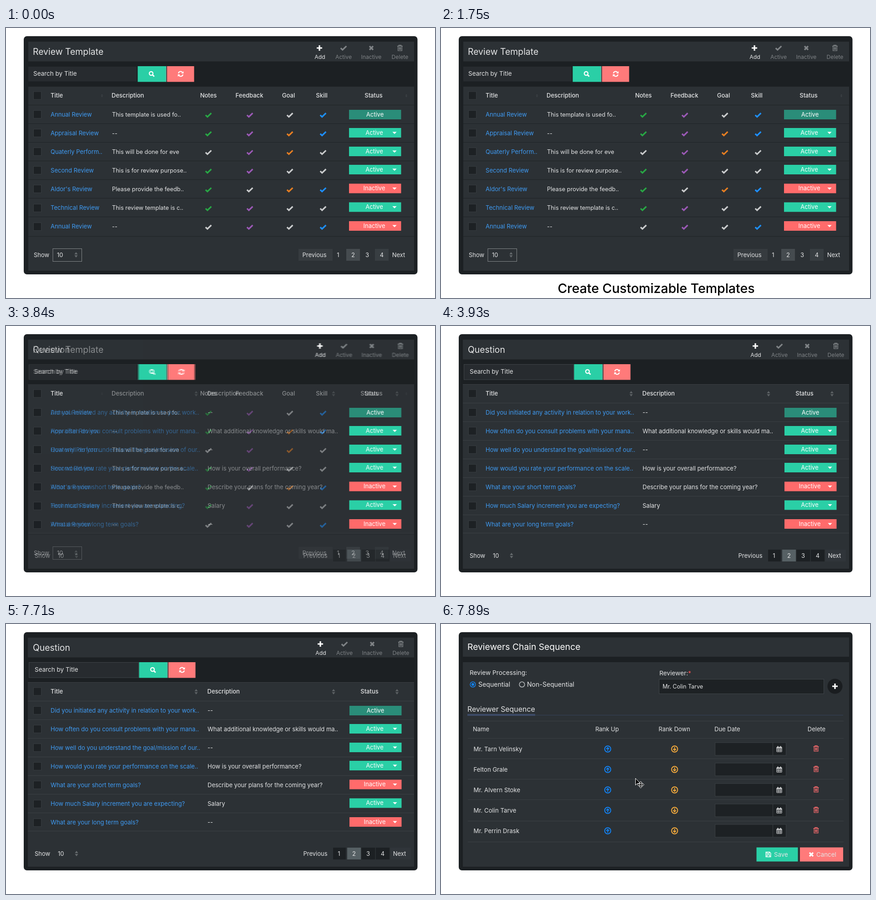
Animation of 943x594 px, one loop 8 s. Source, as an HTML page:

```html
<!DOCTYPE html>
<html lang="en">
<head>
<meta charset="utf-8">
<title>Review screens</title>
<style>
  html, body { margin: 0; width: 100%; height: 100%; overflow: hidden; background: #fff; }
  svg { display: block; }
  text { font: 13px Inter, "Open Sans", sans-serif; fill: #e4e5e6; white-space: pre; }
  .head { font-weight: 500; }
  .link { fill: #3f9bf3; }
  .dim { fill: #7f8386; }
  .caption { font-size: 28.5px; font-weight: 500; fill: #000; text-anchor: middle;
    animation: drop 8s infinite backwards; }
  .late { animation-delay: 3960ms; }
  #second { animation: second 8s infinite; }
  #third { animation: third 8s infinite; }

  /* captions slide out from under the panel, then vanish at once */
  @keyframes drop {
    0% { transform: translateY(-48px); }
    13.125% { transform: translateY(-48px); animation-timing-function: steps(7, jump-both); }
    21.875% { transform: translateY(0); animation-timing-function: step-end; }
    46.875%, 100% { transform: translateY(-48px); }
  }
  @keyframes second {
    0% { opacity: 0; }
    46.875% { opacity: 0; animation-timing-function: steps(6, end); }
    49.125%, 100% { opacity: 1; }
  }
  @keyframes third {
    0% { opacity: 0; }
    96.375% { opacity: 0; animation-timing-function: steps(6, end); }
    98.625%, 100% { opacity: 1; }
  }
</style>
</head>
<body>
<svg id="stage" width="943" height="594" viewBox="0 0 943 594"></svg>
<script>
const DARK = '#1c2023', BODY = '#2c3135', LINE = '#3b4044';
const GREEN = '#2acfa6', RED = '#ff6b6b', PINK = '#ff7a7a', GREY = '#7f8386', WHITE = '#fff';
const TICKS = { g: '#28a745', p: '#9b59b6', w: '#cacccd', o: '#e67e22', b: '#1e90ff' };

const rect = (x, y, w, h, fill, more = '') =>
  `<rect x="${x}" y="${y}" width="${w}" height="${h}" fill="${fill}" ${more}/>`;
const box = (x, y, w, h, fill, edge) =>
  rect(x + .5, y + .5, w - 1, h - 1, fill, `stroke="${edge}"`);
const path = (d, fill, more = '') => `<path d="${d}" fill="${fill}" ${more}/>`;
const stroke = (d, color, width) => path(d, 'none', `stroke="${color}" stroke-width="${width}"`);
const rule = (x1, x2, y, color = LINE) => rect(x1, y, x2 - x1, 1, color);
const at = (x, y, shape) => `<g transform="translate(${x} ${y})">${shape}</g>`;

// y is the middle of the capitals
function label(s, x, y, { size = 13, mid = false, cls = '', style = '' } = {}) {
  return `<text x="${x}" y="${y + size * .36}" class="${cls}" ` +
    `style="font-size:${size}px;${style}"${mid ? ' text-anchor="middle"' : ''}>${s}</text>`;
}

const icon = {
  tick: c => stroke('M-6.3 .3L-2.2 4.1L6.3 -4.1', c, 3.3),
  plus: c => stroke('M-6 0H6M0 -6V6', c, 3.2),
  cross: c => stroke('M-4 -4L4 4M4 -4L-4 4', c, 3.4),
  trash: c => stroke('M-6 -4.3H6M-2.5 -4.5V-6.3H2.5V-4.5', c, 1.4) +
    stroke('M-4.4 -4V5.8H4.4V-4M-1.9 -2V4M0 -2V4M1.9 -2V4', c, 1.3),
  search: c => `<circle cx="-1" cy="-1" r="4" fill="none" stroke="${c}" stroke-width="2.3"/>` +
    stroke('M2 2L5.8 5.8', c, 2.7),
  refresh: c => stroke('M-5 -1.3A5 5 0 0 1 4 -3.2M5 1.3A5 5 0 0 1 -4 3.2', c, 2.1) +
    path('M6.3 -6V-1H1.3ZM-6.3 6V1H-1.3Z', c),
  sort: c => path('M-3.6 -1L0 -6L3.6 -1ZM-3.6 1L0 6L3.6 1Z', c),
  caret: c => path('M-4.7 -2.2H4.7L0 2.5Z', c),
  up: c => `<circle r="6.7" fill="none" stroke="${c}" stroke-width="1.9"/>` +
    stroke('M0 4.2V-2.6M-3.3 .2L0 -3.1L3.3 .2', c, 1.9),
  down: c => `<g transform="scale(1 -1)">${icon.up(c)}</g>`,
  calendar: c => stroke('M-5.5 -4H5.5V6H-5.5ZM-5.5 -.8H5.5M-5.5 2.6H5.5M-1.9 -1V6M1.9 -1V6', c, 1) +
    stroke('M-5.5 -3.2H5.5M-3 -6.5V-3M3 -6.5V-3', c, 1.7),
  floppy: c => stroke('M-5.3 -5.3H2.8L5.3 -2.8V5.3H-5.3ZM-3 5V1H3V5M-3 -5V-2H2V-5', c, 1.4)
};

const checkbox = y => box(60, y - 9, 18, 18, '#1d2124', '#363b3f');

function toolbar(dx) {
  const items = [['Add', 690, 'plus', WHITE], ['Active', 742, 'tick', GREY],
    ['Inactive', 803, 'cross', GREY], ['Delete', 866, 'trash', GREY]];
  return items.map(([name, x, kind, color]) =>
    at(x + dx - (kind === 'plus' ? 1 : 0), 44, icon[kind](color)) +
    label(name, x + dx, 64, { size: 12.2, mid: true, cls: color === GREY ? 'dim' : '' })).join('');
}

function searchBar(dx) {
  return label('Search by Title', 60 + dx, 100.5, { size: 13.5 }) +
    rect(289.5 + dx, 84, 62, 34.5, GREEN) + rect(351.5 + dx, 84, 1, 34.5, '#a9d9cc') +
    at(320 + dx, 101, icon.search(WHITE)) +
    rect(354 + dx, 84, 59.5, 34.5, PINK) + at(384 + dx, 101, icon.refresh(WHITE));
}

const STATUS_Y = [180, 220, 261, 301, 342.5, 383.5, 425];
function status(i, dx) {
  const y = STATUS_Y[i], off = i === 4 || i === 6;
  const fill = i === 0 ? '#2a8d79' : off ? RED : GREEN;
  return rect(754 + dx, y, 114.5, 21, fill) +
    label(off ? 'Inactive' : 'Active', (i ? 809.5 : 811) + dx, y + 10.3, { mid: true, style: 'fill:#fff' }) +
    (i ? at(854 + dx, y + 10.7, icon.caret(WHITE)) : '');
}

const rowY = i => 190 + 41.1 * i;

function listScreen({ title, dx, rows, bottom, line, cells }) {
  const left = dx ? 48 : 49;
  let out = rect(46, 26, 853, 510, DARK) +
    rect(left, 30, 897 - left, 43.5, BODY) + rect(left, 129, 897 - left, 405, BODY) +
    label(title, 59, 52, { size: 19.4 }) + toolbar(dx) + checkbox(148.5) +
    label('Title', 98, 148.5, { cls: 'head' });
  rows.forEach((row, i) => {
    const y = rowY(i);
    out += rule(left, 897, Math.round(168.6 + 41.1 * i), line) + checkbox(Math.round(y)) +
      label(row[0], 98, y, { cls: 'link', size: 13.1 }) + cells(row, y) + status(i, dx / 2);
  });
  return out + rule(left, 897, bottom, line);
}

function pager(y, dx, fills) {
  const cells = [['Previous', 678, 643, 75], ['1', 730, 717, 28], ['2', 763, 748, 30],
    ['3', 794, 779.5, 30], ['4', 826, 811, 30], ['Next', 863, 843, 45]];
  return cells.map(([s, x, left, w], i) =>
    (fills[i] ? rect(left + dx, y - 13, w, 26, fills[i]) : '') +
    label(s, x + dx, y, { mid: true })).join('');
}

function templates() {
  const rows = [
    ['Annual Review', 'This template is used fo..', 'gpwb'],
    ['Appraisal Review', '--', 'gpob'],
    ['Quaterly Perform..', 'This will be done for eve', 'wpow'],
    ['Second Review', 'This is for review purpose..', 'gpww'],
    ['Aldor\'s Review', 'Please provide the feedb..', 'gwob'],
    ['Technical Review', 'This review template is c..', 'gpww'],
    ['Annual Review', '--', 'wpwb']
  ];
  const columns = [445, 536, 624, 697];
  const heads = [['Notes', 445], ['Feedback', 535], ['Goal', 621], ['Skill', 694], ['Status', 808]];
  const cells = (row, y) => label(row[1], 233, y, { size: 12.8 }) +
    columns.map((x, k) => at(x, y + 1.3, icon.tick(TICKS[row[2][k]]))).join('');
  return listScreen({ title: 'Review Template', dx: 0, rows, bottom: 458, line: '#1f2326', cells }) +
    label('Description', 232, 148, { cls: 'head' }) +
    heads.map(([s, x]) => label(s, x, 148, { mid: true, cls: 'head' })).join('') +
    [211, 880].map(x => at(x, 149, `<g transform="scale(.6)">${icon.sort('#3d4246')}</g>`)).join('') +
    rect(49, 85, 238, 32.5, '#272b2f') + searchBar(0) +
    label('Show', 61, 499) + box(102.5, 485, 64.5, 29, 'none', '#85898b') +
    label('10', 112, 499) + at(154, 499, icon.sort('#656a6d')) +
    pager(499, 0, ['#363b3f', '', '#454b4f', '', '#383e42', '']);
}

function questions() {
  const rows = [
    ['Did you initiated any activity in relation to your work..', '--'],
    ['How often do you consult problems with your mana..', 'What additional knowledge or skills would ma..'],
    ['How well do you understand the goal/mission of our..', '--'],
    ['How would you rate your performance on the scale..', 'How is your overall performance?'],
    ['What are your short term goals?', 'Describe your plans for the coming year?'],
    ['How much Salary increment you are expecting?', 'Salary'],
    ['What are your long term goals?', '--']
  ];
  const cells = (row, y) => label(row[1], 443, y);
  return listScreen({ title: 'Question', dx: 2, rows, bottom: 455, line: LINE, cells }) +
    rule(48, 897, 128) +
    label('Description', 442.5, 148, { cls: 'head' }) +
    label('Status', 799, 148, { mid: true, cls: 'head' }) +
    [418, 720, 859.5].map(x => at(x, 149, icon.sort('#5d6265'))).join('') +
    box(50, 84, 242, 34.5, '#272b2f', '#3f4448') + searchBar(3) +
    label('Show', 63, 505) + label('10', 114, 505) + at(155, 505, icon.sort('#656a6d')) +
    pager(505, 2, ['', DARK, '#566064', DARK, DARK, '#30353a']);
}

function radio(x, on) {
  return `<circle cx="${x}" cy="133" r="5.8" fill="none" stroke="${on ? '#1283f5' : '#b9bcbe'}" stroke-width="1.5"/>` +
    (on ? `<circle cx="${x}" cy="133" r="3" fill="#1283f5"/>` : '');
}

function chain() {
  const people = ['Mr. Tarn Velinsky', 'Felton Grale', 'Mr. Alvern Stoke', 'Mr. Colin Tarve', 'Mr. Perrin Drask'];
  const button = { size: 13.3, style: 'font-family:"Liberation Sans",sans-serif;fill:#fff' };
  let out = rect(46, 26, 853, 510, DARK) +
    rect(48, 29.5, 849, 42.5, BODY) + rect(48, 84, 849, 450, BODY) +
    label('Reviewers Chain Sequence', 58, 50, { size: 19.3, style: 'fill:#fff' }) +
    label('Review Processing:', 63, 107, { size: 13.7 }) +
    radio(70, true) + label('Sequential', 82, 133, { size: 14.1 }) +
    radio(178, false) + label('Non-Sequential', 189, 133, { size: 14.1 }) +
    label('Reviewer:<tspan fill="#ff5252">*</tspan>', 480, 108, { size: 13.7 }) +
    box(479, 121, 363, 33, '#1d2124', '#3f4448') +
    label(people[3], 487, 137, { size: 12.5, style: 'font-family:"Noto Sans","Open Sans",sans-serif' }) +
    '<circle cx="866" cy="137" r="16.5" fill="#1a1d20"/>' + at(866, 137, icon.plus(WHITE)) +
    label('Reviewer Sequence', 58, 187, { size: 15.9 }) +
    rule(58, 884, 200, '#34425a') + rect(58, 198, 149, 4, '#3d4b68') +
    label('Name', 70, 231.5) + label('Rank Up', 365, 231.5, { mid: true }) +
    label('Rank Down', 513, 231.5, { mid: true }) + label('Due Date', 601, 231) +
    label('Delete', 825.5, 231, { mid: true }) +
    [213, 251, 296, 341, 386, 433, 479].map(y => rule(59, 885, y)).join('');
  people.forEach((name, i) => {
    const y = 275 + 45 * i;
    out += label(name, 71.5, y, { size: 13.2 }) +
      at(366.5, y, icon.up('#1283f5')) + at(513.5, y, icon.down('#f6ab3c')) +
      box(602, y - 14.5, 157, 29, '#1d2124', '#3b4044') + rect(729, y - 14, 1, 28, '#3b4044') +
      at(743.5, y, icon.calendar('#e4e5e6')) + at(824.5, y - 1, icon.trash('#f26a6c'));
  });
  return out +
    rect(693.5, 491.5, 91, 31, GREEN) + at(719.5, 507, icon.floppy(WHITE)) + label('Save', 732, 507, button) +
    rect(789, 491.5, 95, 31, PINK) + at(814, 507, icon.cross(WHITE)) + label('Cancel', 825, 507, button) +
    path('M427.5 339.5V354.5L431 351L437.5 350Z', '#000', 'stroke="#fff"') +
    at(439, 353.5, path('M0 -7.5L3 -4H1.2V-1.2H4V-3L7.5 0L4 3V1.2H1.2V4H3L0 7.5L-3 4H-1.2V1.2H-4V3L-7.5 0L-4 -3V-1.2H-1.2V-4H-3Z',
      '#000', 'stroke="#fff"'));
}

const caption = (s, x, cls) =>
  `<svg y="543" width="943" height="51" overflow="hidden"><text class="caption ${cls}" x="${x}" y="40">${s}</text></svg>`;

document.getElementById('stage').innerHTML =
  rect(39, 18, 865.5, 524, DARK, 'rx="7"') +
  `<g>${templates()}</g><g id="second">${questions()}</g><g id="third">${chain()}</g>` +
  caption('Create Customizable Templates', 473, '') +
  caption('Multiple Questionnaire', 472.5, 'late');
</script>
</body>
</html>
```
